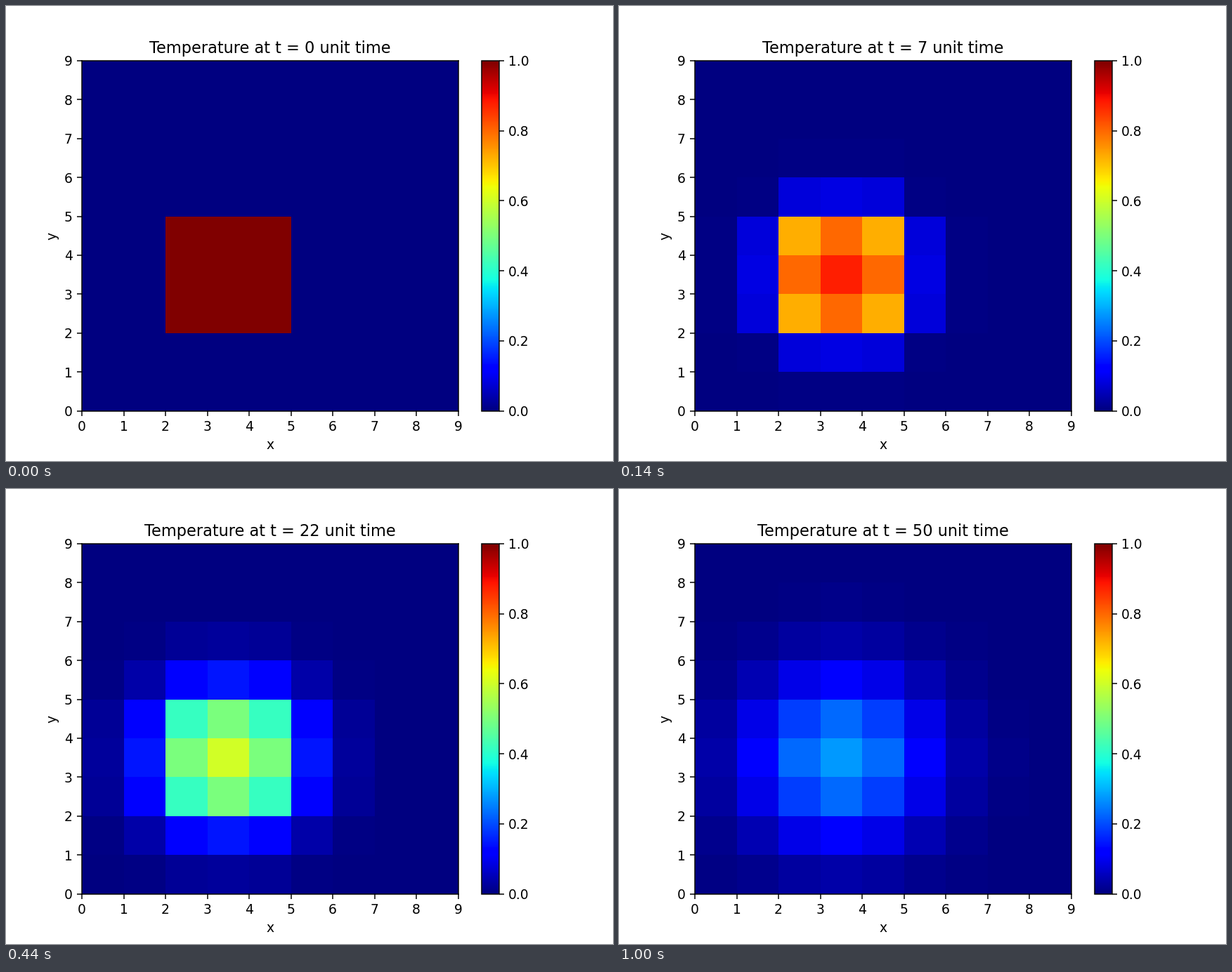
Write a matplotlib script that moves like this. It is 864x648 px and loops after 1020 ms.

```python
import numpy as np
import matplotlib.pyplot as plt
from matplotlib.animation import FuncAnimation

N = 9          # cells per side
STEPS = 51
RATE = 0.016   # exchange with each neighbour, and loss to the surroundings


def step(u):
    p = np.pad(u, 1)
    around = p[:-2, 1:-1] + p[2:, 1:-1] + p[1:-1, :-2] + p[1:-1, 2:]
    return u + RATE * (around - 5 * u)


def simulate():
    u = np.zeros((N, N))
    u[2:5, 2:5] = 1
    states = [u]
    for _ in range(STEPS - 1):
        states.append(step(states[-1]))
    return states


plt.rcParams["font.family"] = "DejaVu Sans"
states = simulate()

fig, ax = plt.subplots(figsize=(6.4, 4.8), dpi=135)
mesh = ax.pcolormesh(states[0], cmap="jet", vmin=0, vmax=1)
fig.colorbar(mesh, ax=ax)
ax.set_xlabel("x")
ax.set_ylabel("y")
ax.set_xticks(range(N + 1))
ax.set_yticks(range(N + 1))
title = ax.set_title("")


def update(k):
    mesh.set_array(states[k])
    title.set_text(f"Temperature at t = {k} unit time")
    return mesh, title


anim = FuncAnimation(fig, update, frames=STEPS, interval=20, repeat=True,
                     repeat_delay=0, blit=False)
plt.show()
```
